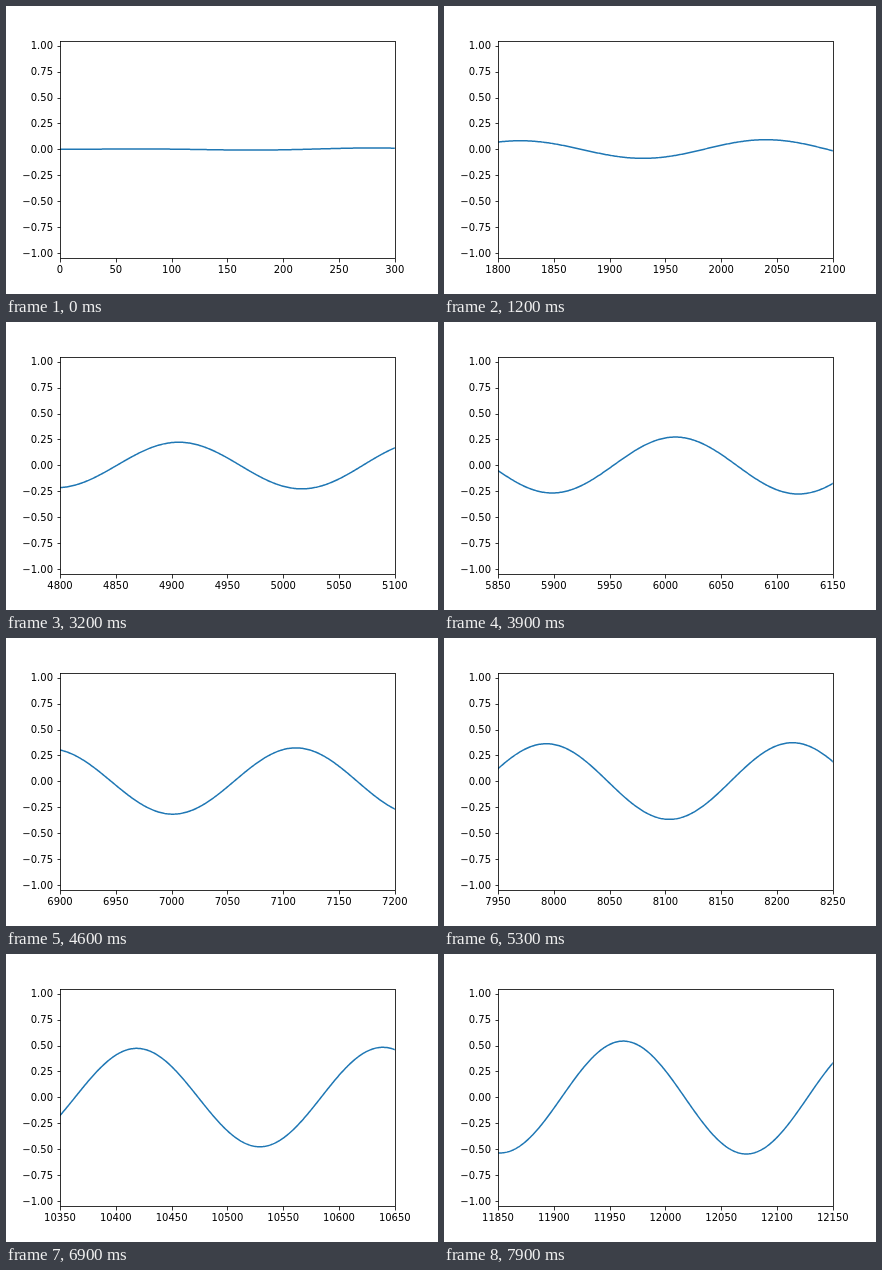
An HTML page with a canvas that plays this animation: 432x288 px, repeating every 8 s.

```html
<!DOCTYPE html>
<html lang="en">
<head>
<meta charset="utf-8">
<title>Growing sine wave</title>
<style>
  html, body { margin: 0; width: 100%; height: 100%; overflow: hidden; background: #fff; }
  canvas { display: block; }
</style>
</head>
<body>
<canvas id="plot" width="432" height="288"></canvas>
<script>
const ctx = document.getElementById('plot').getContext('2d');
const LEFT = 54, RIGHT = 388.8, TOP = 34.56, BOTTOM = 252;
const SPAN = 300, SHIFT = 150, STEP_MS = 100, LOOP_MS = 8000;
const PERIOD = 44100 / 200, FULL = 22050;

const plotX = u => LEFT + u / SPAN * (RIGHT - LEFT);
const plotY = v => (TOP + BOTTOM) / 2 - v / 2.1 * (BOTTOM - TOP);
const snap = p => Math.round(p) + 0.5;
const signal = n => n / FULL * Math.sin(2 * Math.PI * n / PERIOD);

function segment(x1, y1, x2, y2) {
  ctx.beginPath();
  ctx.moveTo(x1, y1);
  ctx.lineTo(x2, y2);
  ctx.stroke();
}

function drawCurve(start) {
  ctx.save();
  ctx.beginPath();
  ctx.rect(LEFT, TOP, RIGHT - LEFT, BOTTOM - TOP);
  ctx.clip();
  ctx.beginPath();
  for (let u = -2; u <= SPAN + 2; u++) ctx.lineTo(plotX(u), plotY(signal(start + u)));
  ctx.strokeStyle = '#1f77b4';
  ctx.lineWidth = 1.5;
  ctx.lineJoin = 'round';
  ctx.stroke();
  ctx.restore();
}

function drawAxes(start) {
  ctx.strokeStyle = ctx.fillStyle = '#000';
  ctx.lineWidth = 0.8;
  ctx.font = '10px "DejaVu Sans", sans-serif';

  ctx.textAlign = 'center';
  for (let u = 0; u <= SPAN; u += 50) {
    const x = snap(plotX(u));
    segment(x, 252.5, x, 256.5);
    ctx.fillText(start + u, plotX(u), 267);
  }

  ctx.textAlign = 'right';
  for (let v = -1; v <= 1; v += 0.25) {
    const y = snap(plotY(v));
    segment(51.5, y, 54.5, y);
    ctx.fillText(v.toFixed(2).replace('-', '\u2212'), 47, Math.round(plotY(v) + 3.7));
  }

  const x = snap(LEFT), y = snap(TOP);
  ctx.strokeRect(x, y, snap(RIGHT) - x, snap(BOTTOM) - y);
}

function draw() {
  const start = Math.floor(performance.now() % LOOP_MS / STEP_MS) * SHIFT;
  ctx.fillStyle = '#fff';
  ctx.fillRect(0, 0, 432, 288);
  drawCurve(start);
  drawAxes(start);
  requestAnimationFrame(draw);
}
draw();
</script>
</body>
</html>
```
